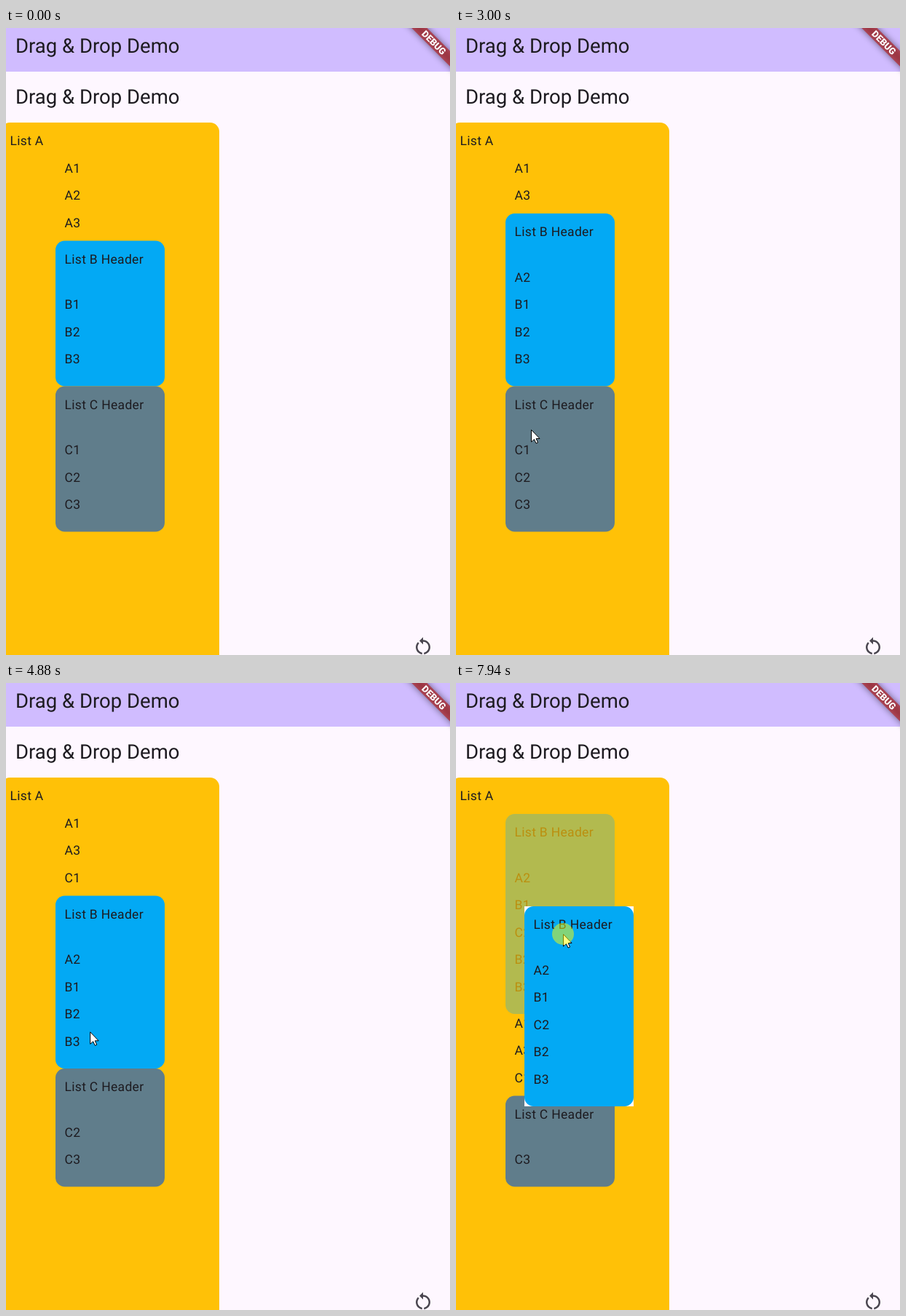
An HTML page with a canvas for the animation above (8 s loop, 610 by 862 pixels).

```html
<!DOCTYPE html>
<html lang="en">
<head>
<meta charset="utf-8">
<title>Drag & Drop Demo</title>
<style>
  html, body { margin: 0; width: 100%; height: 100%; overflow: hidden; background: #fef7ff; }
  canvas { display: block; }
</style>
</head>
<body>
<canvas id="stage" width="610" height="862"></canvas>
<script>
const ctx = document.getElementById('stage').getContext('2d');
const LOOP = 8000, LAG = 100, ROW = 37.5, PAD = 12.5, LEFT = 68;
const INK = '#1d1b20', PAPER = '#fef7ff', GHOST = 0.3, GHOST_INK = '#bb8f0f';
const FILL = { B: '#03a9f4', C: '#607d8b' };

// Pointer stops: arrival time, x, y, time spent resting there.
const stops = [
  [0, 540, 866, 70], [690, 97, 236, 350], [1500, 133, 367, 0], [1600, 126, 393, 0],
  [1810, 113, 411, 0], [2010, 111, 366, 200], [3000, 103, 552, 80], [3130, 97, 584, 0],
  [3760, 155, 318, 0], [3860, 139, 296, 540], [5250, 97, 620, 40], [5720, 94, 536, 0],
  [5820, 83, 505, 0], [6200, 91, 483, 220], [7050, 118, 546, 70], [7500, 121, 330, 40],
  [7840, 147, 345, 160]
];

// Each drag moves its item in front of the named ones, in turn.
const drags = [
  { id: 'A2', press: 1040, drop: 2210, hops: { 1200: 'A1', 1300: 'C', 1400: 'B2', 1900: 'B1' } },
  { id: 'C1', press: 3130, drop: 4400, hops: { 3450: 'C', 3930: 'B' } },
  { id: 'C2', press: 5290, drop: 6420, hops: { 5560: 'A1', 5640: 'B2' } },
  { id: 'B', press: 7540, drop: LOOP, hops: { 7640: 'end', 7710: 'A1' } }
];

const icon = new Path2D('M12 5V2L8 6l4 4V7c3.31 0 6 2.69 6 6 0 2.97-2.17 5.43-5 5.91v2.02' +
  'c3.95-.49 7-3.85 7-7.93 0-4.42-3.58-8-8-8zm-6 8c0-1.65.67-3.15 1.76-4.24L6.34 7.34' +
  'C4.9 8.79 4 10.79 4 13c0 4.08 3.05 7.44 7 7.93v-2.02c-2.83-.48-5-2.94-5-5.91z');
const arrow = new Path2D('M0 0V16.5L4 13L6.5 18.5L9 17.5L6.6 12H11.5Z');

const makeRows = name => [1, 2, 3].map(n => ({ id: name + n }));
const heightOf = item => item.rows ? 7 * PAD + ROW * item.rows.length : ROW;

function pointerAt(t) {
  const i = stops.findLastIndex(s => s[0] <= t);
  const [start, x, y, rest] = stops[i];
  const [end, nextX, nextY] = stops[i + 1] || [LOOP, x, y];
  const k = Math.max(0, (t - start - rest) / (end - start - rest || 1));
  return [x + (nextX - x) * k, y + (nextY - y) * k];
}

function moveItem(root, id, before) {
  const lists = [root, ...root.filter(i => i.rows).map(i => i.rows)];
  const from = lists.find(l => l.some(i => i.id === id));
  const [item] = from.splice(from.findIndex(i => i.id === id), 1);
  const to = lists.find(l => l.some(i => i.id === before)) || root;
  const at = to.findIndex(i => i.id === before);
  to.splice(at < 0 ? to.length : at, 0, item);
}

function itemsAt(t) {
  const root = [...makeRows('A'), ...['B', 'C'].map(id => ({ id, rows: makeRows(id) }))];
  for (const { id, hops } of drags)
    for (const time in hops) if (time <= t) moveItem(root, id, hops[time]);
  return root;
}

function text(str, x, middle, size = 17.5, color = INK) {
  ctx.font = `${size}px Roboto, sans-serif`;
  ctx.letterSpacing = size < 20 ? '0.3125px' : '0px';
  ctx.textRendering = 'geometricPrecision';
  ctx.fillStyle = color;
  ctx.fillText(str, x, Math.round(middle + size * 0.345));
}

function box(x, y, w, h, color, r = 0) {
  ctx.fillStyle = color;
  ctx.beginPath();
  ctx.roundRect(x, y, w, h, r);
  ctx.fill();
}

function row(id, x, y, ghostId, ink) {
  ctx.globalAlpha = id === ghostId ? GHOST : 1;
  text(id, x, y + PAD, 17.5, ink);
  ctx.globalAlpha = 1;
}

function block(item, x, y, ghostId) {
  const ghost = item.id === ghostId, ink = ghost ? GHOST_INK : INK;
  ctx.globalAlpha = ghost ? GHOST : 1;
  box(x, y, 150, heightOf(item), FILL[item.id], PAD);
  ctx.globalAlpha = 1;
  text(`List ${item.id} Header`, x + PAD, y + 2 * PAD, 17.5, ink);
  item.rows.forEach((r, i) => row(r.id, x + PAD, y + 6 * PAD + i * ROW, ghostId, ink));
}

function page(items, ghostId) {
  box(0, 0, 610, 862, PAPER);
  box(0, 0, 610, 60, '#d0bcff');
  for (const y of [25, 95]) text('Drag & Drop Demo', 13, y, 27.5);
  box(-7, 130, 300, 800, '#ffc107', PAD);
  text('List A', 5.5, 155);
  let y = 180;
  for (const item of items) {
    if (item.rows) block(item, LEFT, y, ghostId);
    else row(item.id, LEFT + PAD, y, ghostId);
    y += heightOf(item);
  }
  ctx.save();
  ctx.translate(558, 835);
  ctx.scale(1.25, 1.25);
  ctx.fillStyle = '#49454f';
  ctx.fill(icon);
  ctx.restore();
}

// The card trails the pointer a little.
function card(drag, items, t) {
  const [x, y] = pointerAt(Math.max(drag.press, t - LAG));
  const item = items.find(i => i.rows && i.id === drag.id);
  if (item) {
    box(x - 53, y - 38, 150, heightOf(item), PAPER);
    block(item, x - 53, y - 38);
  } else {
    box(x - 17, y - 16, 125, ROW, PAPER);
    row(drag.id, x - 17, y - 16);
  }
}

function cursor(t, pressed) {
  const [x, y] = pointerAt(t);
  ctx.save();
  ctx.translate(x + 0.5, y + 0.5);
  ctx.fillStyle = '#fff';
  ctx.strokeStyle = '#000';
  ctx.fill(arrow);
  ctx.stroke(arrow);
  ctx.restore();
  if (pressed) box(x - 15, y - 15, 30, 30, 'rgba(255,255,0,.5)', 15);
}

function banner() {
  ctx.save();
  ctx.translate(618, -10);
  ctx.rotate(Math.PI / 4);
  ctx.filter = 'blur(5px)';
  box(-50, 35, 100, 15, 'rgba(0,0,0,.5)');
  ctx.filter = 'none';
  box(-50, 35, 100, 15, 'rgba(183,28,28,.63)');
  ctx.font = '900 12.75px Roboto, sans-serif';
  ctx.letterSpacing = '0px';
  ctx.textAlign = 'center';
  ctx.fillStyle = '#fff';
  ctx.fillText('DEBUG', 0, 47);
  ctx.restore();
}

function draw() {
  const t = performance.now() % LOOP;
  const items = itemsAt(t);
  const drag = drags.find(d => t >= d.press && t < d.drop);
  page(items, drag && drag.id);
  if (drag) card(drag, items, t);
  cursor(t, drag);
  banner();
  requestAnimationFrame(draw);
}
draw();
</script>
</body>
</html>
```
